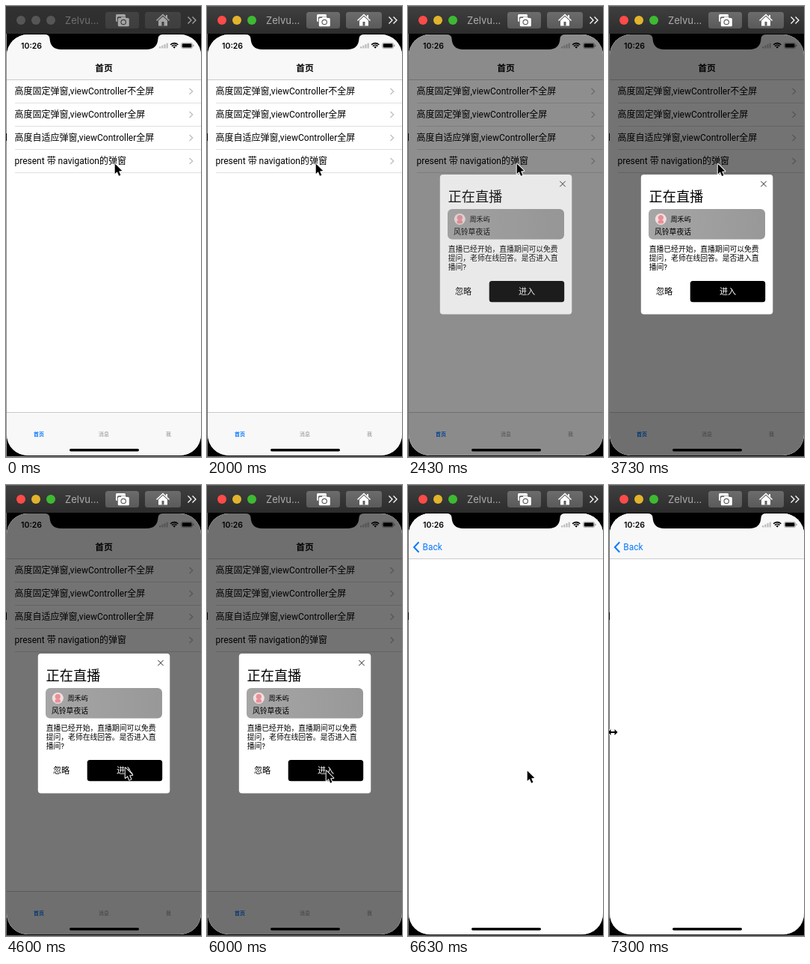
An HTML page with a canvas for the animation above (8000 ms loop, 261 px wide and 602 px high).

```html
<!DOCTYPE html>
<html lang="zh">
<head>
<meta charset="utf-8">
<title>Popup demo</title>
<style>
html, body { margin: 0; width: 100%; height: 100%; overflow: hidden; background: #000; }
canvas { display: block; width: 261px; height: 602px; }
</style>
</head>
<body>
<canvas id="stage"></canvas>
<script>
const W = 261, H = 602, LOOP = 8000, TOP = 38;
const FONT = 'Roboto, "Noto Sans CJK SC", "Noto Sans CJK", sans-serif';
const dpr = window.devicePixelRatio || 1;

function prepare(canvas) {
  canvas.width = W * dpr;
  canvas.height = H * dpr;
  const c = canvas.getContext('2d');
  c.scale(dpr, dpr);
  return c;
}

const screen = prepare(document.getElementById('stage'));
const popupLayer = document.createElement('canvas');
const popup = prepare(popupLayer);
let g = screen;

const clamp = v => Math.max(0, Math.min(1, v));
const mix = (a, b, p) => a + (b - a) * p;
const gray = (a, b, p) => { const v = Math.round(mix(a, b, p)); return `rgb(${v},${v},${v})`; };
const ease = p => { p = clamp(p); return p * p * (3 - 2 * p); };
// Critically damped spring, s in seconds
const spring = (s, w) => s <= 0 ? 0 : 1 - (1 + w * s) * Math.exp(-w * s);

function rect(x, y, w, h, fill) {
  g.fillStyle = fill;
  g.fillRect(x, y, w, h);
}
function round(x, y, w, h, r, fill) {
  g.fillStyle = fill;
  g.beginPath();
  g.roundRect(x, y, w, h, r);
  g.fill();
}
function disc(x, y, r, fill) {
  g.fillStyle = fill;
  g.beginPath();
  g.arc(x, y, r, 0, 7);
  g.fill();
}
function trace(points) {
  g.beginPath();
  points.forEach(([x, y], i) => i ? g.lineTo(x, y) : g.moveTo(x, y));
}
function line(points, color, width) {
  trace(points);
  g.strokeStyle = color;
  g.lineWidth = width;
  g.stroke();
}
function poly(points, fill) {
  trace(points);
  g.closePath();
  g.fillStyle = fill;
  g.fill();
}
// cy is the vertical centre of the glyphs
function text(s, x, cy, size, color = '#000', align = 'left', weight = 400, family = FONT) {
  g.font = `${weight} ${size}px ${family}`;
  g.textAlign = align;
  g.fillStyle = color;
  g.fillText(s, x, cy + size * 0.37);
}
function vertical(y0, y1, c0, c1) {
  const grad = g.createLinearGradient(0, y0, 0, y1);
  grad.addColorStop(0, c0);
  grad.addColorStop(1, c1);
  return grad;
}

function drawToolbar(a) {
  rect(0, 0, W, 37, vertical(0, 37, gray(49, 64, a), gray(45, 44, a)));
  rect(0, 0, W, 1, gray(70, 92, a));
  const lights = [[252, 75, 72], [226, 180, 44], [62, 186, 50]];
  lights.forEach((rgb, i) => {
    disc(20 + 20 * i, 19, 6, `rgb(${rgb.map(v => Math.round(mix(86, v, a))).join()})`);
  });
  text('Zelvu...', 79, 19.5, 13, gray(112, 172, a), 'left', 400, 'Inter, sans-serif');

  const face = vertical(8, 30, gray(67, 108, a), gray(62, 90, a));
  round(133, 8, 45, 22, 3.5, face);
  round(186, 8, 48, 22, 3.5, face);
  const ink = gray(165, 255, a), hole = gray(64, 98, a);

  round(147, 11, 13, 10, 1.5, ink);
  round(148.8, 14.2, 16.5, 13.5, 2, hole);
  round(149.8, 16, 15, 11.2, 1.5, ink);
  round(154, 14.5, 6.4, 3, 1, ink);
  disc(157.2, 21.5, 3.8, hole);
  disc(157.2, 21.5, 2.6, ink);

  line([[201.5, 19.5], [210, 11.5], [218.5, 19.5]], ink, 1.6);
  poly([[204, 19.5], [210, 14], [216, 19.5], [216, 26.5], [204, 26.5]], ink);
  rect(214, 12, 2, 4, ink);
  rect(208.5, 21, 3, 5.5, hole);

  for (const x of [243.5, 249.5]) line([[x, 14.5], [x + 4.5, 19], [x, 23.5]], ink, 1.3);
}

function drawHome() {
  rect(0, TOP, W, H - TOP, '#fff');
  rect(0, TOP, W, 98 - TOP, '#f8f8f8');
  rect(0, 98, W, 1, '#cbcbcb');
  text('首页', 131, 83, 11.8, '#000', 'center', 600);
  const rows = [
    '高度固定弹窗,viewController不全屏',
    '高度固定弹窗,viewController全屏',
    '高度自适应弹窗,viewController全屏',
    'present 带 navigation的弹窗'
  ];
  rows.forEach((label, i) => {
    const y = 114 + 31 * i;
    text(label, 11.5, y, 12);
    line([[245.5, y - 4], [249.7, y], [245.5, y + 4]], '#c2c2c6', 1.4);
    rect(12, y + 15, W, 1, '#dfdfe0');
  });
  rect(0, 542, W, 60, '#f8f8f8');
  rect(0, 542, W, 1, '#c9c9c9');
  text('首页', 44, 571.4, 6.95, '#0a7aff', 'center', 700);
  text('消息', 131, 571.4, 6.95, '#8c8c8c', 'center', 500);
  text('我', 217.5, 571.4, 6.95, '#8c8c8c', 'center', 500);
}

function drawPopup() {
  round(42.8, 225, 176.5, 186.5, 4, '#fff');
  line([[203.3, 233.8], [210.7, 241.2]], '#222', 1);
  line([[210.7, 233.8], [203.3, 241.2]], '#222', 1);
  text('正在直播', 53.5, 254.6, 18.2);

  const shade = g.createLinearGradient(53, 0, 209, 0);
  shade.addColorStop(0, '#a6a6a6');
  shade.addColorStop(1, '#989898');
  round(53, 271, 156, 40.5, 6, shade);
  disc(69.3, 284.5, 7.5, '#f4dfe0');
  disc(69.3, 282.5, 3.6, '#e98f98');
  round(65.5, 286, 7.6, 4.5, 2, '#e98f98');
  text('周禾屿', 82.5, 285, 9.1);
  text('风铃草夜话', 61, 301, 9.8);

  const body = ['直播已经开始，直播期间可以免费', '提问，老师在线回答。是否进入直', '播间?'];
  body.forEach((s, i) => text(s, 53.7, 324.5 + 11.8 * i, 9.8));

  text('忽略', 74, 381, 11.1, '#000', 'center');
  round(108.7, 367, 100.5, 28.2, 3.5, '#000');
  text('进入', 159, 381, 11.1, '#fff', 'center');
}

function drawDetail(x) {
  rect(x, TOP, W, H - TOP, '#fff');
  rect(x, TOP, W, 98 - TOP, '#f8f8f8');
  rect(x, 98, W, 1, '#cbcbcb');
  line([[x + 14.2, 76.3], [x + 7.8, 83], [x + 14.2, 89.7]], '#0a7aff', 2);
  text('Back', x + 19.3, 83, 11.9, '#0a7aff');
}

function drawStatus() {
  text('10:26', 34, 53, 10.5, '#000', 'center', 600, 'Inter, sans-serif');
  for (let i = 0; i < 4; i++) round(205 + 3.2 * i, 54 - 1.5 * i, 2.2, 2.5 + 1.5 * i, 0.6, 'rgba(0,0,0,.24)');
  for (const r of [7, 4.4]) {
    g.beginPath();
    g.arc(225.2, 56.6, r, -Math.PI * 0.76, -Math.PI * 0.24);
    g.strokeStyle = '#000';
    g.lineWidth = 1.6;
    g.stroke();
  }
  poly([[225.2, 56.8], [223.4, 54.6], [225.2, 53.8], [227, 54.6]], '#000');
  g.strokeStyle = 'rgba(0,0,0,.4)';
  g.lineWidth = 0.7;
  g.beginPath();
  g.roundRect(234.6, 49.2, 15, 7.4, 2);
  g.stroke();
  round(235.7, 50.3, 12.8, 5.2, 1.2, '#000');
  rect(250.4, 51.7, 1, 2.4, 'rgba(0,0,0,.5)');
}

function drawNotch() {
  g.fillStyle = '#000';
  g.beginPath();
  g.moveTo(52, 37);
  g.lineTo(52, TOP);
  g.quadraticCurveTo(58, TOP, 58.5, 43.5);
  g.bezierCurveTo(59, 53, 64, 58, 74, 58);
  g.lineTo(188, 58);
  g.bezierCurveTo(198, 58, 203, 53, 203.5, 43.5);
  g.quadraticCurveTo(204, TOP, 210, TOP);
  g.lineTo(210, 37);
  g.fill();
}

function outlined(points) {
  g.lineJoin = 'round';
  trace(points);
  g.closePath();
  g.strokeStyle = '#fff';
  g.lineWidth = 2;
  g.stroke();
  g.fillStyle = '#000';
  g.fill();
  g.lineJoin = 'miter';
}

function drawCursor(t) {
  if (t >= 7250) {
    g.save();
    g.translate(5, 330);
    outlined([[-6.5, 0], [-2.5, -4], [-2.5, -1], [2.5, -1], [2.5, -4], [6.5, 0],
      [2.5, 4], [2.5, 1], [-2.5, 1], [-2.5, 4]]);
    g.restore();
    return;
  }
  const go = ease((t - 3710) / 820);
  let x = mix(145.7, 159.7, go), y = mix(210.5, 375.5, go);
  y += 2 * clamp((t - 4570) / 30) + 2 * clamp((t - 4990) / 80) + 2 * clamp((t - 5360) / 70);
  const out = ease((t - 6700) / 550);
  x = mix(x, 2, out);
  y = mix(y, 330, out);
  g.save();
  g.translate(x, y);
  outlined([[0, 0], [0, 13.6], [3.1, 10.8], [5.4, 16.2], [7.7, 15.2], [5.4, 10], [9.6, 9.6]]);
  g.restore();
}

function draw(t) {
  const active = t < 400 ? 0 : t < 430 ? 0.5 : 1;
  const shown = spring((t - 2215) / 1000, 14);
  const pushed = spring((t - 6010) / 1000, 15);

  rect(0, 0, W, H, '#000');
  g.save();
  g.beginPath();
  g.roundRect(1, TOP, 260, 600 - TOP, 28);
  g.clip();
  drawHome();
  if (shown > 0) {
    rect(0, TOP, W, H - TOP, `rgba(0,0,0,${0.55 * shown})`);
    g.globalAlpha = shown;
    g.drawImage(popupLayer, -78 * pushed, 0, W, H);
    g.globalAlpha = 1;
  }
  if (pushed > 0) {
    rect(0, TOP, W, H - TOP, `rgba(0,0,0,${0.1 * pushed})`);
    drawDetail(W * (1 - pushed));
  }
  drawStatus();
  g.restore();

  drawNotch();
  round(85, 591, 93, 3.5, 1.75, '#000');
  const edge = gray(146, 112, active);
  rect(0, 37, 1, 565, edge);
  rect(0, 170, 1, 10, '#000');
  rect(0, 601, W, 1, edge);
  drawToolbar(active);
  drawCursor(t);
}

g = popup;
drawPopup();
g = screen;

const start = performance.now();
function tick() {
  draw((performance.now() - start) % LOOP);
  requestAnimationFrame(tick);
}
tick();
</script>
</body>
</html>
```
